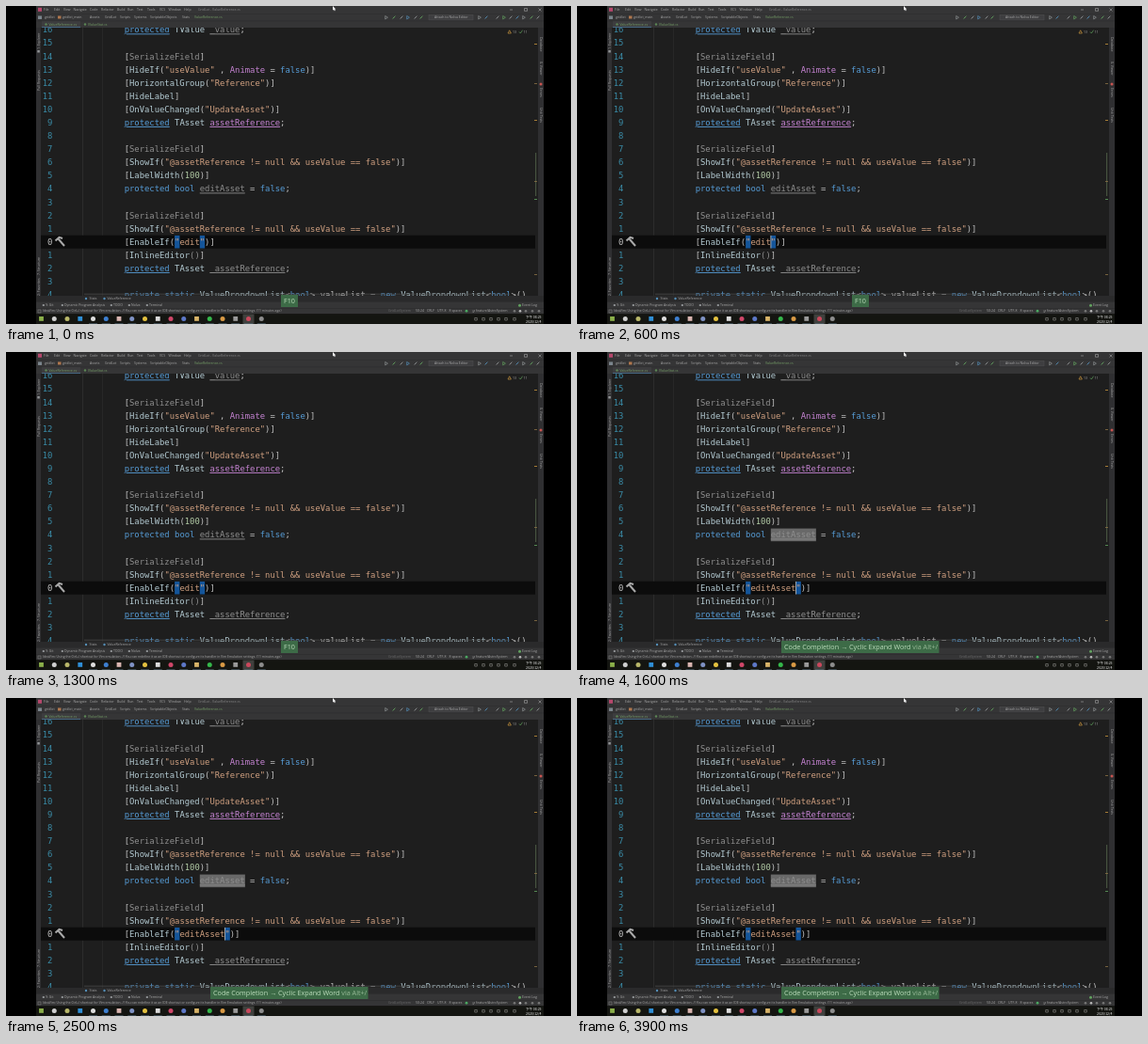
Animation of 600x338 px, one loop 4000 ms. Source, as an HTML page:

```html
<!DOCTYPE html>
<html lang="en">
<head>
<meta charset="utf-8">
<title>Word expansion in an editor</title>
<style>
  html, body { margin: 0; width: 100%; height: 100%; overflow: hidden; background: #000; }
  svg { display: block; width: 600px; height: 338px; }
  text { white-space: pre; }
  .code { font: 8.87px "DejaVu Sans Mono", monospace; fill: #c4c4c4; }
  .num { fill: #3a8ca8; text-anchor: end; }
  .key { fill: #569cd6; }
  .str { fill: #d0a080; }
  .type { fill: #b4cbd3; }
  .digit { fill: #b5cea8; }
  .field { fill: #c583d2; }
  .dim { fill: #8e8e8e; }
  .line { text-decoration: underline 0.6px; }
  .warn { text-decoration: underline 0.7px #4c9a50; }
  .ui { font: 3.5px "Open Sans", sans-serif; fill: #a8a8a8; }
  .toast { font: 7.2px "Open Sans", sans-serif; fill: #bcdcbc; }
  .before { animation: before 4s step-end infinite; }
  .after { animation: after 4s step-end infinite; }
  .caret { animation: blink 4s step-end infinite; }
  @keyframes before { 0% { opacity: 1 } 37.5%, 100% { opacity: 0 } }
  @keyframes after { 0% { opacity: 0 } 37.5%, 100% { opacity: 1 } }
  @keyframes blink {
    0%, 25%, 50%, 77.5%, 97.5%, 100% { opacity: 0 }
    12.5%, 37.5%, 62.5%, 87.5% { opacity: 1 }
  }
</style>
</head>
<body>
<svg id="stage" viewBox="0 0 600 338"></svg>
<script>
const LEFT = 125.7, CHAR = 8.87 * 0.602, PITCH = 14.09, FIRST = 25.3;
const BAR = '#353536', STRIP = '#2f2f31', GREY = '#8f9294', GREEN = '#62a35f', BLUE = '#548fb8';
const col = n => LEFT + n * CHAR;
const row = n => FIRST + n * PITCH;

const esc = s => s.replace(/&/g, '&amp;').replace(/</g, '&lt;').replace(/>/g, '&gt;');
const rect = (x, y, w, h, fill, more = '') =>
  `<rect x="${x}" y="${y}" width="${w}" height="${h}" fill="${fill}" ${more}/>`;
const dot = (x, y, r, fill) => `<circle cx="${x}" cy="${y}" r="${r}" fill="${fill}"/>`;
const path = (d, stroke, w = 0.7) => `<path d="${d}" fill="none" stroke="${stroke}" stroke-width="${w}"/>`;
const text = (x, y, s, cls = 'ui', more = '') => `<text x="${x}" y="${y}" class="${cls}" ${more}>${esc(s)}</text>`;
const group = (cls, ...parts) => `<g class="${cls}">${parts.join('')}</g>`;
const labels = (y, items) => items.map(([x, s]) => text(x, y, s)).join('');
const side = (x, y, s, turn) => text(0, 0, s, 'ui', `transform="translate(${x} ${y}) rotate(${turn})"`);

// A word between two equal marks takes the class of that mark.
const marks = { '~': 'key warn', '^': 'field warn', '|': 'dim line', '%': 'dim', '$': 'field' };
const rule = new RegExp([
  '(?<mark>[~^|%$])(?<word>[^~^|%$]+)\\k<mark>', '(?<str>"[^"]*")',
  '(?<key>\\b(?:protected|private|static|new|bool|false)\\b)',
  '(?<type>(?<=\\[)\\w+|\\bT(?:Asset|Value)\\b|\\bValueDropdownList\\b)', '(?<digit>\\b\\d+\\b)'
].join('|'), 'g');

function paint(src) {
  let out = '', at = 0;
  for (const m of src.matchAll(rule)) {
    const g = m.groups;
    const cls = g.mark ? marks[g.mark] : Object.keys(g).find(k => g[k]);
    out += esc(src.slice(at, m.index)) + `<tspan class="${cls}">${esc(g.word || m[0])}</tspan>`;
    at = m.index + m[0].length;
  }
  return out + esc(src.slice(at));
}
const code = (n, src) => `<text x="${LEFT}" y="${row(n) + 3.1}" class="code">${paint(src)}</text>`;

const lines = [
  '~protected~ TValue |_value|;', '',
  '[%SerializeField%]', '[HideIf("useValue" , $Animate$ = false)]', '[HorizontalGroup("Reference")]',
  '[HideLabel]', '[OnValueChanged("UpdateAsset")]', '~protected~ TAsset ^assetReference^;', '',
  '[%SerializeField%]', '[ShowIf("@assetReference != null && useValue == false")]', '[LabelWidth(100)]',
  'protected bool |editAsset| = false;', '',
  '[%SerializeField%]', '[ShowIf("@assetReference != null && useValue == false")]', '',
  '[InlineEditor%()%]', '~protected~ TAsset |_assetReference|;', '',
  'private static ValueDropdownList<bool> valueList = new ValueDropdownList<bool>()'
];

function activeLine(cls, word) {
  const end = 11 + word.length, top = row(16) - 6.8;
  return group(cls,
    rect(col(10), top, CHAR, 13.6, '#14559a'), rect(col(end), top, CHAR, 13.6, '#14559a'),
    code(16, `[EnableIf("${word}")]`),
    group('caret', rect(col(end) - 0.3, top, 0.8, 13.6, '#c4c4c4')));
}

function editor() {
  const ticks = [[40, '#c9953e'], [82, '#8d7247'], [121, '#c9953e'], [186, '#8d7247'], [205, GREEN], [285, '#8d7247']];
  return rect(37, 23, 528, 285, '#1e1e1e') +
    rect(81, 23, 0.6, 285, '#363636') + rect(102.5, 23, 0.5, 285, '#303030') +
    rect(37, row(16) - 7, 525, 14, '#0c0c0c') +
    group('after', rect(col(15), row(12) - 6.8, 9 * CHAR, 13.6, '#696969')) +
    lines.map((s, i) => text(49.3, row(i) + 3.1, String(Math.abs(16 - i)), 'code num',
      i === 16 ? 'style="fill:#c8c8c8"' : '') + code(i, s)).join('') +
    activeLine('before', 'edit') + activeLine('after', 'editAsset') +
    path('M52.5 249.5L56.5 245.8L60 247M55.5 247.5L62 255', '#a9a9a9', 2) +
    rect(83, 305.5, 452, 1.8, '#4a4a4a', 'opacity=".55"') +
    path('M533 29L534.7 25.8L536.4 29Z', '#c9953e') + text(538, 29, '13') +
    path('M545 27.5L546.3 29L548.5 25.7', GREEN) + text(549.5, 29, '11') +
    rect(562, 156, 1.2, 46, '#46533f') +
    ticks.map(([y, c]) => rect(561, y, 3, 0.8, c)).join('');
}

function topBars() {
  const menu = [[40, 'File'], [51, 'Edit'], [61, 'View'], [71.5, 'Navigate'], [89, 'Code'], [101, 'Refactor'],
    [118, 'Build'], [129, 'Run'], [139, 'Test'], [150, 'Tools'], [163, 'VCS'], [172.5, 'Window'], [189, 'Help']];
  const trail = [[41, 'gridlot'], [60, 'gridlot_main'], [89, 'Assets'], [105, 'GridLot'], [121, 'Scripts'],
    [136, 'Systems'], [153, 'ScriptableObjects'], [187, 'Stats']];
  const tools = [404, 412, 420, 427, 435, 441, 503, 510, 522, 529, 536, 543, 550, 558, 565];
  const tints = [GREY, GREEN, GREY, BLUE];
  const leaf = 'style="fill:#76a068"';
  return rect(32, 0, 539, 23, BAR) + rect(32, 8, 539, 0.5, '#2b2b2c') + rect(32, 15.7, 539, 0.5, '#2a2a2b') +
    rect(34, 1.8, 4, 4, '#b6476c') +
    labels(5.3, menu) + text(204, 5.3, 'GridLot - ValueReference.cs', 'ui', 'opacity=".7"') +
    path('M535 4H538M550.5 2.5H553.5V5.3H550.5ZM565.5 2.5L568.5 5.5M568.5 2.5L565.5 5.5', '#b9b9b9', 0.5) +
    labels(13.4, trail) + text(200, 13.4, 'ValueReference.cs', 'ui', leaf) +
    rect(34, 10.5, 4, 3.5, '#7b858c') + rect(55, 10.5, 3.5, 3, '#b0774d') +
    tools.map((x, i) => i % 3 ? path(`M${x - 1.4} 13.5L${x + 1.4} 10.8`, tints[i % 4], 1)
      : path(`M${x - 1.3} 10.5L${x + 1.4} 12.2L${x - 1.3} 14Z`, tints[i % 4])).join('') +
    rect(449, 9.3, 47, 5.6, '#3e3e40', 'stroke="#555" stroke-width=".4"') +
    text(455, 13.4, 'Attach to Nolva Editor') +
    rect(38, 16.2, 41, 6.8, '#3d3d3f') + rect(38, 22.2, 41, 0.8, '#4a7394') +
    dot(42.5, 19.5, 1.2, '#5c8555') + text(45.5, 20.9, 'ValueReference.cs', 'ui', leaf) +
    dot(84, 19.5, 1.2, '#5c8555') + text(87, 20.9, 'IValueStat.cs', 'ui', leaf) +
    '<path d="M347 0V4.6L348.1 3.7L348.9 5.3L349.7 4.9L349 3.4H350.3Z" fill="#fff"/>';
}

function sideBars() {
  return rect(32, 23, 5, 285, STRIP) + rect(565, 23, 6, 285, STRIP) +
    side(35.8, 46, '1: Explorer', -90) + rect(33.3, 47, 2.5, 2.5, GREY) +
    side(35.8, 90, 'Pull Requests', -90) +
    side(35.8, 286, '7: Structure', -90) + side(35.8, 308, '2: Favorites', -90) +
    side(566.7, 33, 'Database', 90) + side(566.7, 59, 'IL Viewer', 90) +
    dot(568, 83, 1.5, '#c75450') + side(566.7, 87, 'Errors', 90) + side(566.7, 108, 'Unit Tests', 90);
}

function bottomBars() {
  const status = 'IdeaVim: Using the Ctrl+/ shortcut for Vim emulation. // You can redefine it as an IDE shortcut ' +
    'or configure its handler in Vim Emulation settings. (11 minutes ago)';
  const tools = [[42, '9: Git'], [62, 'Dynamic Program Analysis'], [114, 'TODO'], [133, 'Nolva'], [152, 'Terminal']];
  const info = [[435, '50:24'], [447, 'CRLF'], [458, 'UTF-8'], [470.5, '8 spaces'], [499, 'feature/AstroSystem']];
  return rect(32, 308, 539, 19.5, BAR) + rect(32, 308, 539, 6.6, '#2a2a2b') + rect(32, 321.4, 539, 0.5, '#28282a') +
    dot(85, 311, 1.2, BLUE) + text(88.5, 312.3, 'Stats') +
    dot(104.5, 311, 1.2, BLUE) + text(107.5, 312.3, 'ValueReference') +
    labels(319.4, tools) + tools.map(([x]) => rect(x - 3.2, 317, 2, 2, GREY)).join('') +
    text(548, 319.4, 'Event Log') + dot(545.5, 318.2, 1.5, GREEN) +
    rect(34, 323, 3, 3, 'none', 'stroke="#888" stroke-width=".5"') +
    text(39, 325.4, status, 'ui', 'style="font-size:3.4px"') +
    text(406, 325.4, 'GridLotSystem', 'ui', 'opacity=".45"') + labels(325.4, info) +
    dot(489, 324.2, 1.4, '#4ba862') + path('M496 323V326M497.5 323V324.5L496 325.5', '#999', 0.5) +
    [540, 546, 552, 559, 566].map((x, i) => dot(x, 324.2, 1.3, i === 1 ? '#b9b9b9' : '#777')).join('');
}

function taskbar() {
  const icons = ['#8bb04a', '#cfcfcf', '#b9b86a', '#2f8fd6', '#dedede', '#3d7fd0', '#d9b5b0', '#7f92c4', '#e3c13f',
    '#dcdcdc', '#d0476a', '#5d78c8', '#d8b469', '#35b84b', '#d99a45', '#9a9a9a', '#c9485c', '#8d8d8d'];
  const x = i => 37.5 + i * 13.75;
  return rect(32, 327.5, 539, 10.5, '#141511') + rect(x(16) - 6, 327.5, 12, 10.5, '#3f403d') +
    icons.map((c, i) => i % 3 ? dot(x(i), 332.4, 2.5, c) : rect(x(i) - 2.4, 330, 4.8, 4.8, c)).join('') +
    icons.map((c, i) => i > 3 ? rect(x(i) - 4.5, 337.4, 9, 0.6, '#556b78') : '').join('') +
    [499, 507, 515, 523, 531, 540].map(v => path(`M${v - 1.3} 334V331.5H${v + 1.3}V334Z`, '#a9a9a5', 0.5)).join('') +
    `<g style="font-family:'Noto Sans CJK TC','Noto Sans CJK',sans-serif">` +
    text(552, 331.6, '下午 08:25', 'ui', 'style="font-family:inherit;fill:#eee"') +
    text(552, 336.8, '2020/12/4', 'ui', 'style="font-family:inherit;fill:#eee"') + '</g>';
}

function toasts() {
  const box = (x, w) => rect(x, 307, w, 13, '#3d6b47');
  return group('before', box(292, 18), text(301, 316.2, 'F10', 'toast', 'text-anchor="middle"')) +
    group('after', box(217, 167.5),
      `<text x="220" y="316.2" class="toast">Code Completion → Cyclic Expand Word <tspan fill="#94b795">via Alt+/</tspan></text>`);
}

document.getElementById('stage').innerHTML =
  rect(0, 0, 600, 338, '#000') + editor() + topBars() + sideBars() + bottomBars() + taskbar() + toasts();
</script>
</body>
</html>
```
